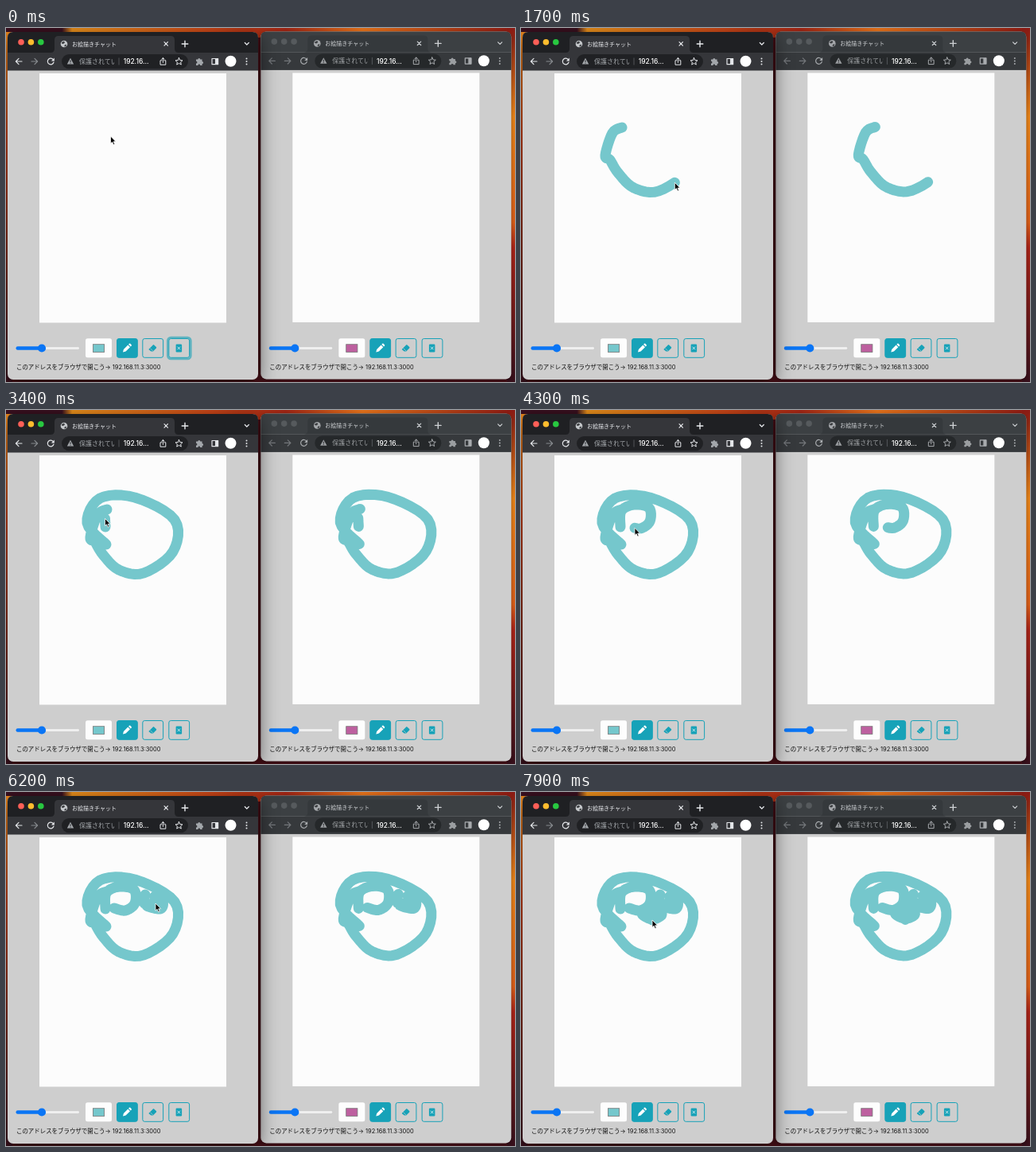
An HTML page that plays this animation: 640 by 445 pixels, repeating every 8000 ms.

```html
<!DOCTYPE html>
<html lang="ja">
<head>
<meta charset="utf-8">
<title>お絵描きチャット</title>
<style>
html, body { margin: 0; width: 100%; height: 100%; overflow: hidden; background: #3a0e14; }
svg { display: block; }
text { font-family: Inter, "Noto Sans CJK JP", "Noto Sans CJK", sans-serif; white-space: pre; }
.ink { fill: none; stroke: #75c7cc; stroke-width: 13; stroke-linecap: round; stroke-linejoin: round; }
.line { fill: none; stroke-width: 1.2; stroke-linecap: round; stroke-linejoin: round; }
</style>
</head>
<body>
<svg id="stage" width="640" height="445" viewBox="0 0 640 445" xmlns="http://www.w3.org/2000/svg"></svg>
<script>
const LOOP = 8000, STEP = 100;

// Each stroke runs along a spline through a few key points, evenly spaced in time.
const strokes = [
  { start: 400, end: 2800, pts: [
    [127, 125], [115, 132], [106, 160], [112, 166], [122, 182], [142, 201], [173, 205],
    [210, 178], [212, 138], [162, 110], [118, 111], [102, 142], [126, 169]] },
  { start: 3300, end: 4400, pts: [
    [125, 147], [126, 127], [142, 119], [161, 123], [162, 140], [150, 149], [136, 146]] },
  { start: 5000, end: 6200, pts: [
    [175, 129], [174, 140], [190, 139], [187, 131], [197, 138], [194, 147], [177, 143], [188, 140]] },
  { start: 6600, end: 7900, pts: [
    [157, 146], [160, 144], [164, 147], [152, 153], [165, 160], [177, 154], [162, 149], [165, 161]] }
];

const rect = (x, y, w, h, fill, r = 0, more = "") =>
  `<rect x="${x}" y="${y}" width="${w}" height="${h}" rx="${r}" fill="${fill}" ${more}/>`;
const dot = (x, y, r, fill) => `<circle cx="${x}" cy="${y}" r="${r}" fill="${fill}"/>`;
const line = (d, color, width = 1.2) => `<path class="line" d="${d}" stroke="${color}" style="stroke-width:${width}"/>`;
const shape = (d, fill) => `<path d="${d}" fill="${fill}"/>`;
const text = (x, y, size, fill, str, more = "") =>
  `<text x="${x}" y="${y}" font-size="${size}" fill="${fill}" ${more}>${str}</text>`;

function tabBar(on) {
  const fg = on ? "#e8eaed" : "#cdd0d3";
  const lights = on ? ["#ff5f57", "#febc2e", "#28c840"] : Array(3).fill("#565a5d");
  return shape("M2 31V12q0-7 7-7H310q7 0 7 7V31Z", on ? "#1f2023" : "#3c4043") +
    lights.map((c, i) => dot(19 + i * 12.4, 17.7, 3.8, c)).join("") +
    shape("M56 31q5 0 5-5V15q0-5 5-5H207q5 0 5 5V26q0 5 5 5Z", on ? "#35363a" : "#35393c") +
    dot(73, 20, 4.3, on ? "#c4c7ca" : "#a4a7aa") +
    shape("M70 18l3-1.5 1 2-2 1.5-2-.5ZM73.5 21.5l2.5-1-.5 2.5-2 .5Z", "#3b3d40") +
    text(83, 22.6, 7, fg, "お絵描きチャット", 'font-weight="500"') +
    line("M199 17.7l4.4 4.4M203.4 17.7l-4.4 4.4", fg) +
    line("M221.2 20h7.6M225 16.2v7.6", fg, 1.4) +
    line("M300.3 18.5l2.5 2.5 2.5-2.5", fg);
}

function toolBar(on) {
  const fg = on ? "#e3e5e8" : "#a8abae", dim = on ? "#86898d" : "#74777b", hint = on ? "#a3a7ab" : "#9b9ea1";
  return rect(2, 31, 315, 22.5, on ? "#35363a" : "#36393c") +
    line("M20 42h-7.5M16 38.4l-3.6 3.6 3.6 3.6", on ? fg : dim) +
    line("M32 42h7.5M36 38.4l3.6 3.6-3.6 3.6", dim) +
    line("M59.6 40a3.9 3.9 0 1 0 .4 3", fg) + shape("M60.8 37.6v3.9h-3.9Z", fg) +
    rect(70, 33, 159, 18.2, on ? "#202124" : "#25282a", 9.1) +
    shape("M81 37.8l4.2 7.6h-8.4Z", hint) + line("M81 40.7v2M81 44.2v.1", "#202124", .9) +
    text(92, 45, 8, hint, "保護されてい", 'clip-path="url(#hint)"') +
    rect(141.6, 37.5, .8, 9, "#5f6368") +
    text(147.7, 45.2, 8.4, "#fff", "192.16...", 'font-weight="500"') +
    line("M195.8 40.8h-1.8v5.4h6.8v-5.4h-1.8M197.4 43.5v-5.8M195.6 39.3l1.8-1.8 1.8 1.8", fg, 1) +
    line("M217.5 37.5l1.3 3 3.2.3-2.4 2.1.7 3.2-2.8-1.7-2.8 1.7.7-3.2-2.4-2.1 3.2-.3Z", fg, 1) +
    shape("M239 39.5h2.3a1.5 1.5 0 1 1 3 0h2.3v2.4a1.5 1.5 0 1 1 0 3v2h-2.4a1.4 1.4 0 0 0-2.8 0h-2.4v-2.3a1.4 1.4 0 0 0 0-2.8Z", dim === fg ? fg : hint) +
    line("M259 38.5h7.6v7.2h-7.6Z", fg) + rect(263, 38.2, 3.9, 7.6, fg) +
    dot(282.5, 41.8, 7, "#fff") +
    [-3.5, 0, 3.5].map(d => dot(302.5, 42 + d, 1, fg)).join("");
}

function controls(swatch, on) {
  const teal = "#17a2b8";
  const button = (x, fill) => rect(x + .5, 390.5, 25.8, 23.8, fill, 2.5, `stroke="${teal}"`);
  return rect(13, 400.6, 79.5, 3.8, "#f0f0f0", 1.9, 'stroke="#b8b8b8" stroke-width=".5"') +
    rect(12.5, 400.3, 34, 4.4, "#0a75f5", 2.2) + dot(45, 402.5, 5.1, "#0a75f5") +
    rect(100, 390.3, 33, 24, "#fdfdfd", 2.5) +
    rect(109.4, 397.7, 14.2, 9.8, swatch, 0, 'stroke="#777" stroke-width=".8"') +
    button(139, teal) +
    shape("M147 407.5l.9-3.6 5.4-5.4 2.7 2.7-5.4 5.4ZM154.1 397.7l.9-.9q.6-.5 1.2 0l1.5 1.5q.5.6 0 1.2l-.9.9Z", "#fff") +
    button(171.3, "none") +
    shape("M179.8 403.4l5-5q.7-.6 1.4 0l2.7 2.7q.6.7 0 1.4l-4 4h-2.4l-2.7-2.1q-.6-.6 0-1Z", teal) +
    line("M181.6 402.9l2.7 2.7", "#cecece", .7) +
    (on ? rect(203.3, 389, 29, 27, "none", 4, 'id="focus" stroke="#17a2b8" stroke-opacity=".6" stroke-width="2.6"') : "") +
    button(204.3, "none") +
    rect(213.6, 397.6, 7.5, 9.9, teal, 1.2) +
    line("M215.9 401l2.9 2.9M218.8 401l-2.9 2.9", "#e8f4f6", .9) +
    text(13, 429, 7.45, "#111", "このアドレスをブラウザで開こう→ 192.168.11.3:3000");
}

function win(x, y, on, swatch) {
  const shadow = on ? "0 6px 12px rgba(0,0,0,.6)" : "0 2px 3px rgba(0,0,0,.4)";
  return `<g transform="translate(${x} ${y})">` +
    rect(2, 5, 315, 437, "#cecece", 7, `style="filter:drop-shadow(${shadow})"`) +
    tabBar(on) + toolBar(on) +
    rect(42, 57, 235, 313.5, "#fcfcfc") + `<path class="ink"/>` +
    `<g transform="translate(0 ${-y})">${controls(swatch, on)}</g></g>`;
}

const ramp = (id, dir, stops) => `<linearGradient id="${id}" ${dir}>` +
  stops.map(([o, c]) => `<stop offset="${o}" stop-color="${c}"/>`).join("") + `</linearGradient>`;
const down = 'x2="0" y2="1"';

const stage = document.getElementById("stage");
stage.innerHTML = `<defs><clipPath id="hint"><rect x="90" y="34" width="47" height="16"/></clipPath>` +
  ramp("top", "", [[.11, "#3a1020"], [.13, "#f0941c"], [.4, "#d04818"], [.55, "#9c2414"], [.7, "#e0701a"], [1, "#8a1812"]]) +
  ramp("side", down, [[0, "#8a1a14"], [.25, "#f08818"], [.55, "#e06018"], [.62, "#b02418"], [1, "#38101c"]]) +
  ramp("left", down, [[0, "#f08a1c"], [.3, "#c84018"], [1, "#38101c"]]) + `</defs>` +
  rect(0, 0, 640, 445, "#4a1018") + rect(0, 0, 640, 12, "url(#top)") +
  rect(0, 5, 8, 440, "url(#left)") + rect(630, 0, 10, 445, "url(#side)") +
  win(318.3, -.6, false, "#bd609f") + win(0, 0, true, "#75c7cc") +
  `<path id="cursor" d="M0 0V9.2L2.1 7.3 3.6 10.8 5.2 10.1 3.7 6.8H6.6Z" fill="#000" stroke="#fff" stroke-width=".8"/>`;

const inks = stage.querySelectorAll(".ink");
const cursor = document.getElementById("cursor");
const focusRing = document.getElementById("focus");

// Catmull-Rom position at u, counted in key points.
function along(pts, u) {
  const i = Math.min(Math.floor(u), pts.length - 2), f = u - i;
  const b = pts[i], c = pts[i + 1], a = pts[i - 1] || b, d = pts[i + 2] || c;
  return b.map((v, k) => v + f / 2 * (c[k] - a[k] +
    f * (2 * a[k] - 5 * v + 4 * c[k] - d[k] + f * (3 * (v - c[k]) + d[k] - a[k]))));
}

function progress({ start, end, pts }, t) {
  return Math.min(1, (t - start) / (end - start)) * (pts.length - 1);
}

function trace(stroke, t) {
  const u = progress(stroke, t), n = Math.ceil(u * 6) || 1;
  const dots = Array.from({ length: n + 1 }, (_, i) => along(stroke.pts, u * i / n));
  return "M" + dots.join("L");
}

function cursorAt(t) {
  let from = [131.5, 136], since = 0;
  for (const s of strokes) {
    if (t < s.start) {
      const k = (t - since) / (s.start - since), ease = k * k * (3 - 2 * k);
      return from.map((v, i) => v + (s.pts[0][i] - v) * ease);
    }
    if (t <= s.end) return along(s.pts, progress(s, t));
    from = s.pts.at(-1);
    since = s.end;
  }
  return from;
}

function draw(t) {
  const d = strokes.filter(s => t >= s.start).map(s => trace(s, t)).join("");
  inks.forEach(p => p.setAttribute("d", d));
  cursor.setAttribute("transform", `translate(${cursorAt(t)})`);
  focusRing.setAttribute("visibility", t < strokes[0].start ? "visible" : "hidden");
}

let t0, last = -1;
function tick(now) {
  t0 ??= now;
  const t = Math.floor((now - t0) % LOOP / STEP) * STEP;
  if (t !== last) draw(last = t);
  requestAnimationFrame(tick);
}
draw(0);
requestAnimationFrame(tick);
</script>
</body>
</html>
```
